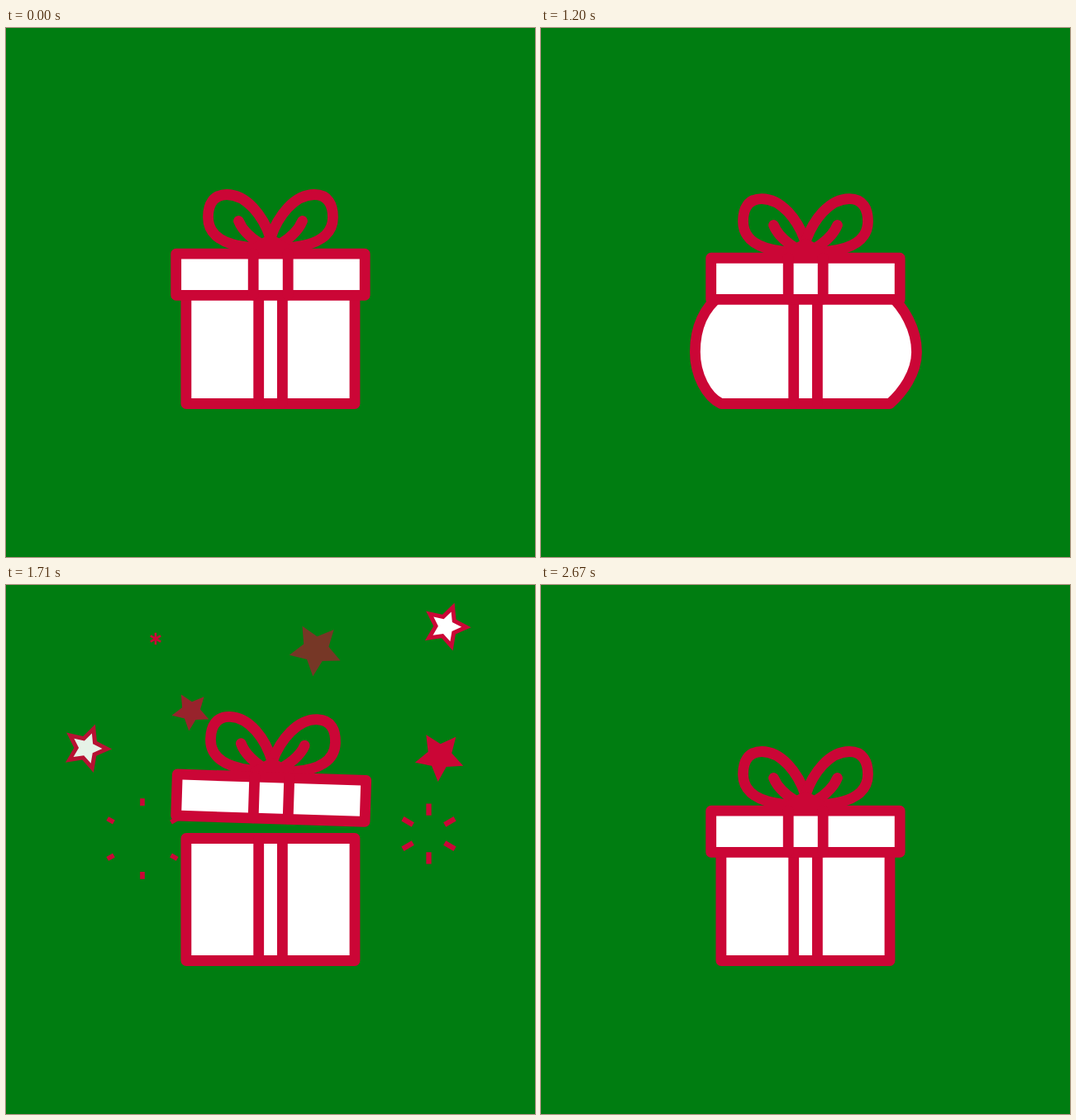
An HTML page that plays this animation: 640 by 640 pixels, repeating every 2.73 s.

```html
<!DOCTYPE html>
<html lang="en">
<head>
<meta charset="utf-8">
<title>Gift box</title>
<style>
  html, body { margin: 0; width: 100%; height: 100%; overflow: hidden; background: #007d11; }
  svg { display: block; width: 100%; height: 100%; }
  .line { stroke: #cb0636; stroke-width: 12.8; stroke-linecap: round; stroke-linejoin: round; fill: none; }
  .paper { fill: #fff; }
  .red { fill: #cb0636; }
</style>
</head>
<body>
<svg viewBox="0 0 640 640">
  <rect width="640" height="640" fill="#007d11"/>
  <g id="back"></g>
  <g id="body" class="line">
    <path id="shell" class="paper"/>
    <path d="M305.7 307V454M334.4 307V454"/>
  </g>
  <g id="lid" class="line">
    <g id="bow">
      <path id="loop" d="M320 254C311 227 291 201.500 267 201.500C250 201.500 244.500 214 244.500 229C244.500 251 264 262 292 265M281.500 233.500C286 245 297 256 318 267"/>
      <use href="#loop" transform="matrix(-1 0 0 1 640 0)"/>
      <path d="M300 267L320 256L340 267Z" class="red"/>
    </g>
    <path class="paper" d="M205.700 273.200H434.200V323.300H205.700Z"/>
    <path d="M299.200 273V323M341.200 273V323"/>
  </g>
  <g id="front"></g>
</svg>
<script>
const LOOP = 2730, STEP = 30, GROW = 420, FADE = 480;
const $ = id => document.getElementById(id);
const clamp = v => Math.max(0, Math.min(1, v));
const mix = (a, b, k) => a + (b - a) * k;
const smooth = u => (1 - Math.cos(Math.PI * u)) / 2;

function add(tag, parent, attrs = {}) {
  const el = document.createElementNS('http://www.w3.org/2000/svg', tag);
  for (const k in attrs) el.setAttribute(k, attrs[k]);
  return parent.appendChild(el);
}

// Eased value between [time, value] keys
function track(t, keys) {
  if (t <= keys[0][0]) return keys[0][1];
  for (let i = 1; i < keys.length; i++) {
    const [t0, a] = keys[i - 1], [t1, b] = keys[i];
    if (t < t1) return mix(a, b, smooth((t - t0) / (t1 - t0)));
  }
  return keys[keys.length - 1][1];
}

const LID_Y = [[0, 0], [900, 13], [1115, 13], [1500, -56], [2096, 0]];
const TILT = [[1250, 0], [1500, 5], [1860, 0]];
const BULGE = [[0, 0], [900, 1], [1200, 1], [1380, 0]];
const HOP = [[1320, 0], [1500, -14], [1620, 0]];

const stars = [
  { from: [353, 185], to: [375, 77], r: 33, born: 1382, gone: 1990 },
  { from: [291, 376], to: [536, 45], r: 31, born: 1395, gone: 2195, white: true },
  { from: [290, 258], to: [96, 197], r: 31, born: 1371, gone: 2142, white: true },
  { from: [278, 291], to: [223, 151], r: 24, born: 1390, gone: 2070, front: true },
  { from: [302, 332], to: [534, 202], r: 32, born: 1434, gone: 2195 }
];
const bursts = [
  { at: [165, 307], r: 50, born: 1207, life: 955 },
  { at: [181, 65], r: 39, born: 1678, life: 800 },
  { at: [447.5, 171], r: 52, born: 1882, life: 750 },
  { at: [511.500, 301], r: 44, born: 1508, life: 680 }
];

function starPath(r) {
  let d = '';
  for (let i = 0; i < 10; i++) {
    const a = i * Math.PI / 5, q = i % 2 ? r * 0.49 : r;
    d += (i ? 'L' : 'M') + (q * Math.sin(a)).toFixed(2) + ' ' + (-q * Math.cos(a)).toFixed(2);
  }
  return d + 'Z';
}

for (const s of stars) {
  s.el = add('g', $(s.front ? 'front' : 'back'));
  add('path', s.el, { d: starPath(s.r), class: 'red' });
  if (s.white) add('path', s.el, { d: starPath(s.r * 0.62), class: 'paper' });
}
for (const b of bursts) b.el = add('path', $('back'), { stroke: '#cb0636', fill: 'none' });

function shell(k) {
  const l = v => 217.9 - v * k, r = v => 422 + v * k;
  return `M${l(0)} 306.500V323C${l(20.5)} 338 ${l(31.5)} 362 ${l(31.5)} 392` +
    `C${l(31.5)} 420 ${l(17.5)} 446 ${l(0)} 454.500H${r(0)}` +
    `C${r(15)} 441 ${r(32.5)} 418 ${r(32.5)} 392` +
    `C${r(32.5)} 364 ${r(17)} 338 ${r(0)} 323V306.500Z`;
}

function drawStar(s, t) {
  const u = clamp((t - s.born) / GROW);
  const p = 1 - (1 - u) ** 3;
  const turn = s.white ? 20 : 43 - 80 * (1 - p);
  const x = mix(s.from[0], s.to[0], p), y = mix(s.from[1], s.to[1], p);
  s.el.setAttribute('transform', `translate(${x} ${y}) rotate(${turn}) scale(${p})`);
  s.el.setAttribute('opacity', u > 0 ? clamp((s.gone - t) / FADE) : 0);
}

function drawBurst(b, t, hop) {
  const u = (t - b.born) / b.life;
  let d = '';
  if (u > 0 && u < 1) {
    const outer = b.r * (1 - (1 - u) ** 5);
    const inner = b.r * (1 - (1 - Math.max(0, u - 0.05)) ** 2.47);
    for (let i = 0; i < 6; i++) {
      const c = Math.cos((i * 60 + 30) * Math.PI / 180), s = Math.sin((i * 60 + 30) * Math.PI / 180);
      d += `M${b.at[0] + c * inner} ${b.at[1] + hop + s * inner}L${b.at[0] + c * outer} ${b.at[1] + hop + s * outer}`;
    }
    b.el.setAttribute('stroke-width', 6.3 * Math.min(1, 0.3 + u * 3, (1 - u) * 1.9));
    b.el.setAttribute('opacity', clamp((1 - u) * 3));
  }
  b.el.setAttribute('d', d);
}

function draw(t) {
  const tilt = track(t, TILT), hop = track(t, HOP);
  $('shell').setAttribute('d', shell(track(t, BULGE)));
  $('body').setAttribute('transform', `translate(0 ${hop})`);
  $('lid').setAttribute('transform',
    `translate(${tilt * 0.4} ${track(t, LID_Y)}) rotate(${tilt} 320 298.500)`);
  for (const s of stars) drawStar(s, t);
  for (const b of bursts) drawBurst(b, t, hop);
}

const start = performance.now();
function tick() {
  const t = (performance.now() - start) % LOOP;
  draw(Math.min(2670, Math.floor(t / STEP) * STEP));
  requestAnimationFrame(tick);
}
tick();
</script>
</body>
</html>
```
